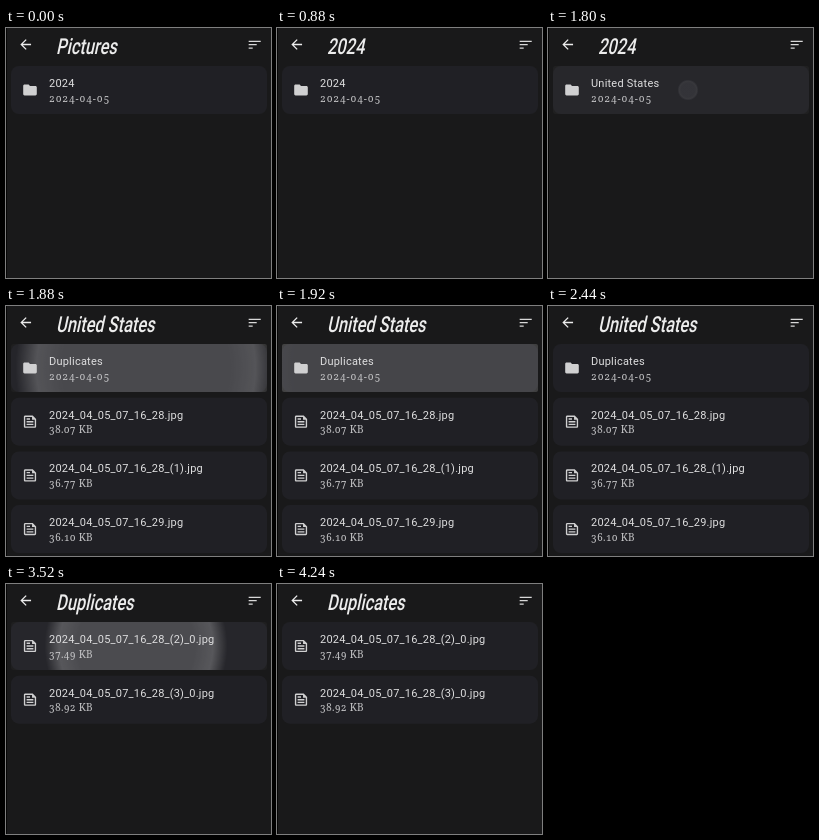
These frames come from a looping animation (265 by 250 pixels, 4.72 s). An HTML page:

```html
<!DOCTYPE html>
<html lang="en">
<head>
<meta charset="utf-8">
<title>File browser</title>
<style>
  html, body { margin: 0; width: 100%; height: 100%; overflow: hidden; background: #19191a; }
  svg { display: block; width: 100%; height: 100%; }
  .title { font: 500 22px Roboto, "Liberation Sans", sans-serif; fill: #ececec; }
  .name { font: 400 11px Roboto, "Liberation Sans", sans-serif; letter-spacing: .22px; fill: #dededf; }
  .info { font: 400 10px "Noto Serif", "Liberation Serif", serif; letter-spacing: .25px;
          font-variant-numeric: oldstyle-nums; fill: #c4c4c6; }
  .date { letter-spacing: .85px; }
</style>
</head>
<body>
<svg viewBox="0 0 265 250" xmlns="http://www.w3.org/2000/svg">
  <defs>
    <path id="folder" d="M10 4H4c-1.1 0-2 .9-2 2v12c0 1.1.9 2 2 2h16c1.1 0 2-.9 2-2V8c0-1.1-.9-2-2-2h-8z"/>
    <path id="file" d="M16 3H5c-1.1 0-2 .9-2 2v14c0 1.1.9 2 2 2h14c1.1 0 2-.9 2-2V8zm3 16H5V5h10v4h4zM7 17h10v-2H7zm5-10H7v2h5zm-5 6h10v-2H7z"/>
    <path id="back" d="M20 11H7.8l5.6-5.6L12 4l-8 8 8 8 1.4-1.4L7.8 13H20z"/>
    <path id="sort" d="M3 18h6v-2H3zM3 6v2h18V6zm0 7h12v-2H3z"/>
    <radialGradient id="wave" gradientUnits="userSpaceOnUse" cy="62">
      <stop offset="0" stop-color="#fff" stop-opacity=".2"/>
      <stop offset=".65" stop-color="#fff" stop-opacity=".2"/>
      <stop offset=".84" stop-color="#fff" stop-opacity=".26"/>
      <stop offset="1" stop-color="#fff" stop-opacity="0"/>
    </radialGradient>
  </defs>
  <rect width="265" height="250" fill="#19191a"/>
  <rect width="1" height="250" fill="#060606"/>
  <use href="#back" fill="#ececec" transform="translate(19.7 16.5) scale(.67) translate(-12 -12)"/>
  <use href="#sort" fill="#d8d8d8" transform="translate(248.7 16.7) scale(.67) translate(-12 -12)"/>
  <text id="title" class="title" transform="translate(50 25.6) skewX(-12) scale(.745 1)"></text>
  <g id="cards"></g>
  <g id="ripple">
    <rect x="5" y="38" width="256" height="48" rx="2" fill="#fff" fill-opacity=".03"/>
    <rect id="glow" x="5" y="38" width="256" height="48" rx="2" fill="url(#wave)"/>
  </g>
  <g id="lists"></g>
</svg>
<script>
const LOOP = 4720, PITCH = 53.7, RIPPLE = 500;
const $ = id => document.getElementById(id);
const folder = name => ({ icon: 'folder', name, info: '2024-04-05', style: 'info date' });
const file = (name, size) => ({ icon: 'file', name: `2024_04_05_07_16_${name}.jpg`, info: size + ' KB', style: 'info' });

const screens = [
  { title: 'Pictures', titleAt: 0, listAt: 0, rows: [folder('2024')] },
  { title: '2024', titleAt: 880, listAt: 920, rows: [folder('United States')] },
  { title: 'United States', titleAt: 1840, listAt: 1840, rows: [
    folder('Duplicates'), file('28', '38.07'), file('28_(1)', '36.77'), file('29', '36.10')] },
  { title: 'Duplicates', titleAt: 3440, listAt: 3480, rows: [
    file('28_(2)_0', '37.49'), file('28_(3)_0', '38.92')] }
];
const taps = [{ at: 900, x: 70 }, { at: 1794, x: 140 }, { at: 3460, x: 130 }];

const rowMarkup = (row, i) => `<g transform="translate(0 ${i * PITCH})">
  <use href="#${row.icon}" fill="#d0d0d1" transform="translate(24 62) scale(.68) translate(-12 -12)"/>
  <text class="name" x="43" y="59">${row.name}</text>
  <text class="${row.style}" x="43" y="73.5">${row.info}</text></g>`;

$('cards').innerHTML = [0, 1, 2, 3].map(i =>
  `<rect x="5" y="${38 + i * PITCH}" width="256" height="48" rx="8" fill="#202025"/>`).join('');
$('lists').innerHTML = screens.map(s => `<g>${s.rows.map(rowMarkup).join('')}</g>`).join('');

const show = (el, on) => el.setAttribute('display', on ? 'inline' : 'none');
const latest = (key, t) => screens.filter(s => s[key] <= t).pop();

function drawRipple(t) {
  const tap = taps.find(p => t >= p.at && t < p.at + RIPPLE);
  show($('ripple'), tap);
  if (!tap) return;
  const age = t - tap.at;
  $('ripple').setAttribute('opacity', 1 - age / RIPPLE);
  $('glow').setAttribute('opacity', Math.min(1, .2 + age / 60));
  $('wave').setAttribute('cx', tap.x);
  $('wave').setAttribute('r', Math.max(.1, age * 1.5));
}

function draw(t) {
  const list = latest('listAt', t);
  $('title').textContent = latest('titleAt', t).title;
  [...$('lists').children].forEach((g, i) => show(g, screens[i] === list));
  [...$('cards').children].forEach((card, i) => show(card, i < list.rows.length));
  drawRipple(t);
}

const start = performance.now();
function tick() {
  draw((performance.now() - start) % LOOP);
  requestAnimationFrame(tick);
}
tick();
</script>
</body>
</html>
```
